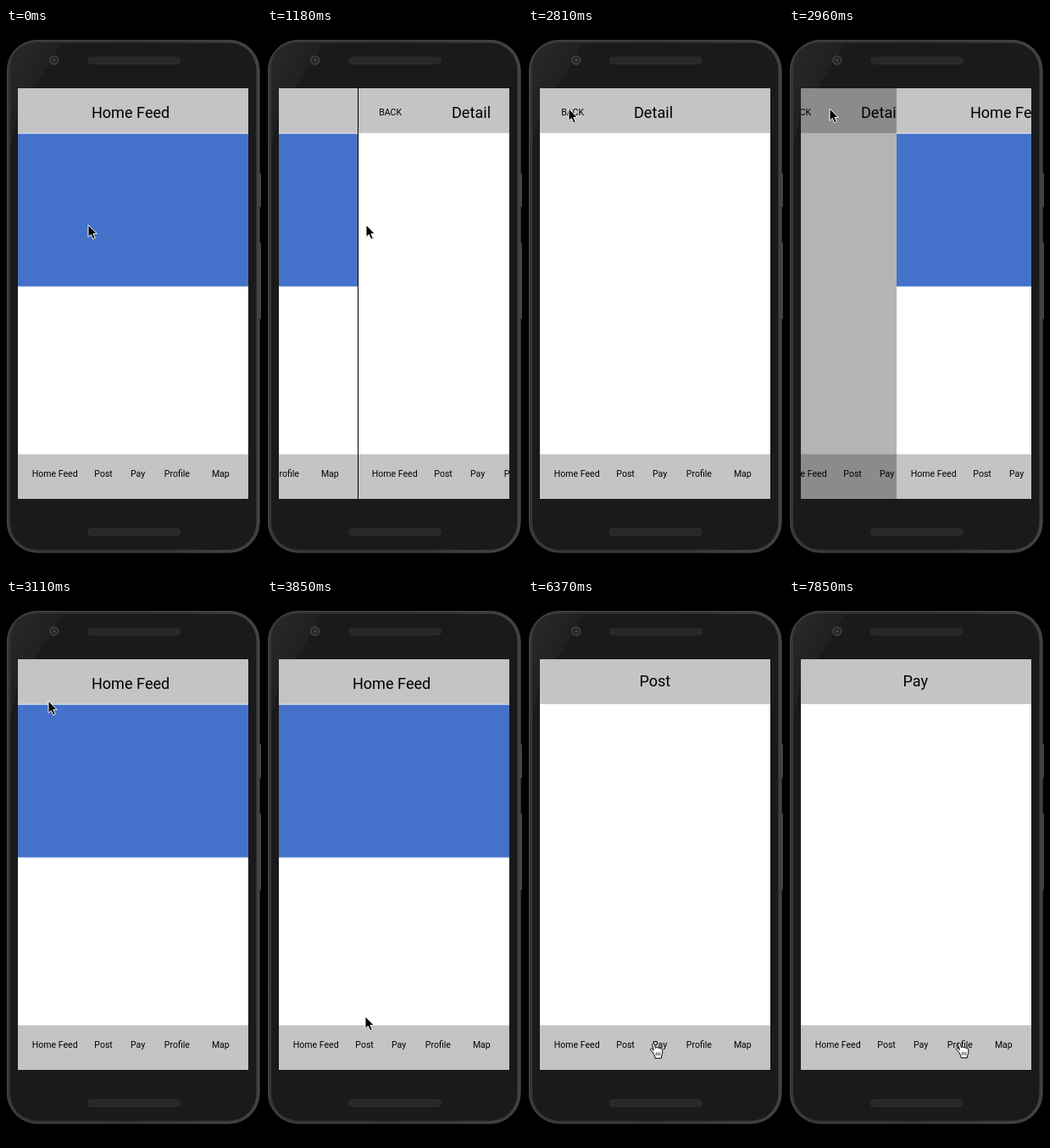
An HTML page for the animation above (8000 ms loop, 301 px wide and 640 px high).

```html
<!DOCTYPE html>
<html lang="en">
<head>
<meta charset="utf-8">
<title>Phone prototype</title>
<style>
  html, body { margin: 0; width: 100%; height: 100%; overflow: hidden; background: #000; }
  svg { display: block; width: 301px; height: 640px; }
  text { font-family: Roboto, Arial, sans-serif; font-size: 10.56px; fill: #000; }
  .title { font-size: 18.1px; }
</style>
</head>
<body>
<svg viewBox="0 0 301 640">
  <defs>
    <linearGradient id="rim" x1="0" y1="0" x2="1" y2="0">
      <stop offset="0" stop-color="#363636"/>
      <stop offset=".5" stop-color="#303030"/>
      <stop offset="1" stop-color="#414141"/>
    </linearGradient>
    <linearGradient id="sheen" x1="0" y1="0" x2="1" y2="1">
      <stop offset="0" stop-color="#292929"/>
      <stop offset=".8" stop-color="#1a1a1a"/>
    </linearGradient>
    <clipPath id="screen"><rect x="14" y="71" width="272" height="484"/></clipPath>
    <g id="nav">
      <rect x="14" y="502.4" width="272" height="52.6" fill="#c4c4c4"/>
      <text x="30.8" y="529">Home Feed</text>
      <text x="104.3" y="529">Post</text>
      <text x="146.9" y="529">Pay</text>
      <text x="186.8" y="529">Profile</text>
      <text x="242.9" y="529">Map</text>
    </g>
  </defs>

  <rect width="301" height="640" fill="#000"/>
  <g fill="#454545">
    <rect x="297" y="171" width="4" height="40" rx="1"/>
    <rect x="297" y="253" width="4" height="90" rx="1"/>
  </g>
  <rect x="1" y="14" width="298.5" height="604.5" rx="36" fill="url(#rim)"/>
  <rect x="1.6" y="14.6" width="297.3" height="603.3" rx="35.4" fill="none" stroke="#474747"/>
  <rect x="5" y="17.5" width="290.5" height="597.5" rx="32" fill="#1a1a1a"/>
  <path d="M5 140V50Q5 17.5 38 17.5H66L34 71H14V100Z" fill="url(#sheen)"/>
  <circle cx="56.8" cy="38" r="5.8" fill="#3d3d3d"/>
  <circle cx="56.8" cy="38" r="3.6" fill="#202020"/>
  <circle cx="57" cy="38" r="1.7" fill="#4a4a4a"/>
  <g fill="#282828" stroke="#303030" stroke-width=".8">
    <rect x="96.4" y="34.4" width="109" height="8" rx="4"/>
    <rect x="96.4" y="590" width="109" height="8.4" rx="4"/>
  </g>

  <g clip-path="url(#screen)" id="pages"></g>

  <g id="arrow">
    <path d="M0 1V15.6L3.4 12.6L5.8 18L8.8 16.8L6.4 11.4H10.8Z" fill="#000" opacity=".25"/>
    <path d="M0 0V14.4L3.3 11.4L5.7 16.9L8.3 15.8L5.9 10.4H10.2Z" fill="#000" stroke="#fff" stroke-width="1" stroke-linejoin="round"/>
  </g>
  <g id="hand">
    <path d="M-.9 10.6L-3.2 8.4C-4.4 7.2-2.8 5.8-1.5 6.9L.3 8.4L-1.3 2C-1.7 .1.7-.4 1.2 1.4L2.5 5.9C2.6 4.3 5 4.3 5.3 6C5.8 4.9 7.7 5.1 8 6.7C8.9 5.9 10.4 6.4 10.6 7.9C10.9 10.5 11 12.4 9.9 14.3L9.3 17.8H2.2L1.8 15.6C1.2 13.7 0 12 -.9 10.6Z"
          fill="#fff" stroke="#000" stroke-width="1" stroke-linejoin="round"/>
    <path d="M3.4 10.8V14.6M5.6 10.8V14.6M7.8 10.8V14.6" stroke="#000" stroke-width=".8"/>
  </g>
</svg>
<script>
const LOOP = 8000, STEP = 148.15, LAST = 53;
const WIDTH = 272, SLIDE = 250;
const PUSH_AT = 1066, COVER_AT = 2860, POST_AT = 4585, PAY_AT = 6805;

const $ = id => document.getElementById(id);

const page = (id, title, x, y, extra = '') => `
  <g id="${id}">
    <rect x="14" y="71" width="272" height="484" fill="#fff"/>
    <rect x="14" y="71" width="272" height="52.8" fill="#c4c4c4"/>
    <text class="title" x="${x}" y="${y}">${title}</text>
    <use href="#nav"/>${extra}
  </g>`;

$('pages').innerHTML =
  page('detail', 'Detail', 125, 105.7, `
    <text x="39.2" y="103.3">BACK</text>
    <rect id="edge" x="14" y="71" width="1" height="484"/>
    <rect id="dim" x="14" y="71" width="272" height="484"/>`) +
  page('home', 'Home Feed', 100.9, 105.7,
    '<rect x="14" y="124.6" width="272" height="180" fill="#4472ca"/>') +
  page('post', 'Post', 131.4, 103.4) +
  page('pay', 'Pay', 134.5, 103.4);

// Pointer path: time, x, y
const path = [
  [0, 97, 232], [148, 102, 300], [444, 112, 560], [593, 112, 622],
  [889, 115, 400], [1037, 117, 232], [1630, 117, 232], [1926, 116, 341],
  [2222, 72, 170], [2370, 48, 82], [2815, 48, 95], [2963, 48, 95],
  [3111, 50, 120], [3407, 66, 280], [3704, 80, 450], [3852, 116, 492],
  [4000, 110, 511], [4148, 108, 520], [4296, 107.5, 522.5], [5630, 107.5, 522.5],
  [6222, 140, 523], [6520, 156, 524], [7259, 156, 524], [7852, 201, 523]
];
const handSpans = [[2370, 2700], [4100, POST_AT], [6350, PAY_AT], [7690, LOOP]];

const clamp = v => Math.min(1, Math.max(0, v));

// cubic-bezier(0, 0, .58, 1)
function easeOut(t) {
  let lo = 0, hi = 1;
  for (let i = 0; i < 20; i++) {
    const s = (lo + hi) / 2;
    if (1.74 * (1 - s) * s * s + s ** 3 < t) lo = s; else hi = s;
  }
  return 3 * (1 - lo) * lo * lo + lo ** 3;
}

const slide = (t, start) => t >= start + SLIDE ? 1 : easeOut(clamp((t - start) / SLIDE));

function pointerAt(t) {
  const i = path.findIndex(p => p[0] > t);
  if (i < 0) return path[path.length - 1].slice(1);
  const [t0, x0, y0] = path[i - 1], [t1, x1, y1] = path[i];
  const k = (t - t0) / (t1 - t0);
  return [x0 + (x1 - x0) * k, y0 + (y1 - y0) * k];
}

const show = (el, on) => el.setAttribute('visibility', on ? 'visible' : 'hidden');
const move = (el, x, y = 0) => el.setAttribute('transform', `translate(${x} ${y})`);

function draw(t) {
  const push = slide(t, PUSH_AT), cover = slide(t, COVER_AT);

  // Whole pixels keep the sliding edges crisp
  const homeX = t < COVER_AT ? -WIDTH * push : WIDTH * (1 - cover);
  const detailX = WIDTH * (1 - push) - WIDTH / 4 * cover;
  move($('home'), Math.round(homeX));
  move($('detail'), Math.round(detailX));
  $('dim').setAttribute('opacity', cover / 2);
  show($('edge'), push > 0 && push < 1);
  show($('post'), t >= POST_AT && t < PAY_AT);
  show($('pay'), t >= PAY_AT);

  const [x, y] = pointerAt(t);
  const hand = handSpans.some(([a, b]) => t >= a && t < b);
  show($('hand'), hand);
  show($('arrow'), !hand);
  move($(hand ? 'hand' : 'arrow'), x, y);
}

// The screen refreshes in even steps, like a recording
const start = performance.now();
function tick() {
  const t = (performance.now() - start) % LOOP;
  draw(Math.min(LAST, Math.floor((t + 6) / STEP)) * STEP);
  requestAnimationFrame(tick);
}
tick();
</script>
</body>
</html>
```
